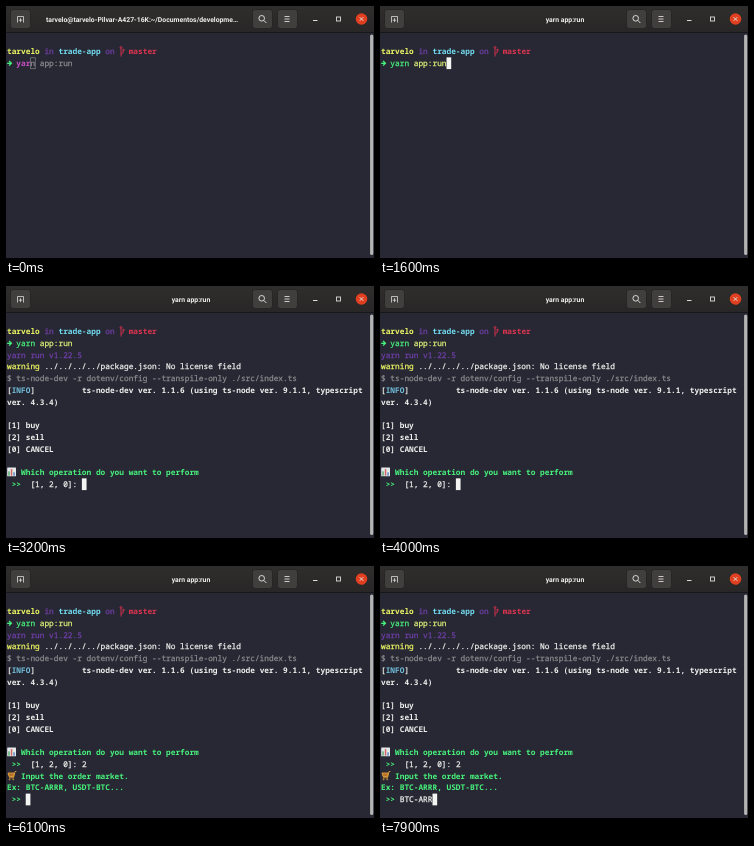
These frames come from a looping animation (368x252 px, 8 s). An HTML page:

```html
<!DOCTYPE html>
<html lang="en">
<head>
<meta charset="utf-8">
<title>Terminal</title>
<style>
  html, body { margin: 0; width: 100%; height: 100%; overflow: hidden; background: #272833; }
  svg { display: block; width: 368px; height: 252px; }
  text { white-space: pre; text-rendering: geometricPrecision; }
  #screen text { font: 500 7.8px "Noto Sans Mono", "DejaVu Sans Mono", monospace; font-variant-ligatures: none; stroke-width: .25; }
  #screen text.bold { font-weight: 700; stroke-width: 0; }
  .title { font: 700 6.85px Roboto, "Open Sans", sans-serif; fill: #f0efed; text-anchor: middle; }
  .button { fill: #413f3e; stroke: #242222; stroke-width: .8; }
  .icon { fill: none; stroke: #dddbd9; stroke-width: 1; }
</style>
</head>
<body>
<svg viewBox="0 0 368 252">
  <defs>
    <linearGradient id="bar" x2="0" y2="1">
      <stop stop-color="#302e2d"/><stop offset="1" stop-color="#282626"/>
    </linearGradient>
  </defs>
  <rect width="368" height="252" fill="#272833"/>
  <rect x="364.1" y="28.5" width="3.2" height="220.5" rx="1.6" fill="#b4b4b5"/>

  <rect width="368" height="26.5" fill="url(#bar)"/>
  <path d="M0 26.5H368" stroke="#191819"/>
  <g class="button">
    <rect x="4.5" y="3.5" width="20" height="19" rx="3"/>
    <rect x="246.5" y="3.5" width="20" height="19" rx="3"/>
    <rect x="271.5" y="3.5" width="20" height="19" rx="3"/>
  </g>
  <g class="icon">
    <path d="M11.5 16.5V10.5H17.5V16.5M14.5 12.2V16M12.8 14.2H16.2" stroke-width=".8"/>
    <circle cx="255.7" cy="12.3" r="2.8"/>
    <path d="M257.8 14.4L260.4 17"/>
    <path d="M278.5 10.5H283.5M278.5 13H283.5M278.5 15.5H283.5" stroke-width=".9"/>
    <path d="M307 14.5H311.5"/>
    <rect x="330.5" y="11" width="4" height="4" stroke-width=".9"/>
  </g>
  <circle cx="355.5" cy="13" r="5.8" fill="#e0401f"/>
  <path class="icon" d="M353.7 11.2L357.3 14.8M357.3 11.2L353.7 14.8"/>
  <g id="titles"></g>

  <g id="screen">
    <g fill="none" stroke="#dc3350" stroke-width=".9">
      <path d="M115 42.5V50.5M115 48Q117.5 47.3 117.5 44.8"/>
      <circle cx="115" cy="41.5" r=".9"/>
      <circle cx="117.5" cy="44" r=".8"/>
    </g>
    <path d="M1.2 57.3H4.6M3.1 55L5.4 57.3L3.1 59.6" fill="none" stroke="#48f37d" stroke-width="1.3"/>
  </g>
</svg>

<script>
const LOOP = 8000, CELL = 4.68, LINE = 11.75, LEFT = 1, TOP = 39.6;
const color = {
  white: '#f0f0ee', gray: '#8b8b8f', yellow: '#f0f963', lime: '#dcf279', cyan: '#72dcf2',
  blue: '#71bfdd', purple: '#703fa8', magenta: '#c94fc4', red: '#e03551', green: '#48f37d'
};
const screen = document.getElementById('screen');
const timed = [];

function add(parent, tag, attrs, from = 0, to = LOOP) {
  const el = document.createElementNS('http://www.w3.org/2000/svg', tag);
  for (const key in attrs) el.setAttribute(key, attrs[key]);
  parent.append(el);
  if (from > 0 || to < LOOP) timed.push({ el, from, to });
  return el;
}

const cellX = col => LEFT + col * CELL;
const cellY = row => TOP + row * LINE;

function write(row, col, text, fill, from, to, bold = false) {
  add(screen, 'text', {
    x: cellX(col), y: cellY(row) + 8.4, fill: color[fill], stroke: color[fill], class: bold ? 'bold' : ''
  }, from, to).textContent = text;
}
const strong = (row, col, text, fill, from, to) => write(row, col, text, fill, from, to, true);

function title(text, x, from, to) {
  add(document.getElementById('titles'), 'text', { class: 'title', x, y: 15.6 }, from, to).textContent = text;
}

title('tarvelo@tarvelo-Pilvar-A427-16K:~/Documentos/developme…', 136, 0, 1600);
title('yarn app:run', 185, 1600);

// Cursor steps: time, row, column; no column hides it.
const cursorSteps = [
  [100, 1, 6], [700], [1100, 1, 14], [2000, 5, 0], [2200], [2800, 7, 0],
  [3200, 13, 16], [3400], [4000, 13, 16], [4600], [4900, 13, 16],
  [5500, 13, 17], [6100, 16, 4], [6700, 16, 5], [6800, 16, 6], [6900, 16, 7],
  [7400, 16, 8], [7600, 16, 9], [7700, 16, 10], [7900, 16, 11]
];
cursorSteps.forEach(([from, row, col], i) => {
  if (col === undefined) return;
  const to = cursorSteps[i + 1]?.[0] ?? LOOP;
  add(screen, 'rect', { x: cellX(col), y: cellY(row), width: CELL, height: LINE, fill: '#f4f4f2' }, from, to);
});
add(screen, 'rect', {
  x: cellX(5) + .2, y: cellY(1) + .4, width: CELL, height: LINE - .8,
  fill: 'none', stroke: '#77777c', 'stroke-width': .8
}, 0, 100);

// Shell prompt
strong(0, 0, 'tarvelo', 'yellow');
write(0, 8, 'in', 'purple');
strong(0, 11, 'trade-app', 'cyan');
write(0, 21, 'on', 'purple');
strong(0, 26, 'master', 'red');
strong(1, 2, 'yar', 'magenta', 0, 100);
write(1, 5, 'n', 'gray', 0, 100);
write(1, 2, 'yarn', 'green', 100);
write(1, 7, 'app:run', 'gray', 0, 1100);
write(1, 7, 'app:run', 'lime', 1100);

// Startup output
write(2, 0, 'yarn run v1.22.5', 'purple', 2000);
write(3, 0, 'warning', 'yellow', 2000);
write(3, 8, '../../../../package.json: No license field', 'white', 2000);
write(4, 0, '$ ts-node-dev -r dotenv/config --transpile-only ./src/index.ts', 'gray', 2000);
strong(5, 0, '[', 'white', 2200);
strong(5, 1, 'INFO', 'blue', 2200);
strong(5, 5, ']', 'white', 2200);
strong(5, 16, 'ts-node-dev ver. 1.1.6 (using ts-node ver. 9.1.1, typescript', 'white', 2200);
strong(6, 0, 'ver. 4.3.4)', 'white', 2200);

// Menu
['[1] buy', '[2] sell', '[0] CANCEL'].forEach((text, i) => strong(8 + i, 0, text, 'white', 3200));
strong(12, 3, 'Which operation do you want to perform', 'green', 3200);
strong(13, 1, '>>', 'green', 3200);
write(13, 5, '[1, 2, 0]:', 'white', 3200);
write(13, 16, '2', 'white', 5500);

// Market input
strong(14, 3, 'Input the order market.', 'green', 6100);
strong(15, 0, 'Ex: BTC-ARRR, USDT-BTC...', 'green', 6100);
strong(16, 1, '>>', 'green', 6100);
const keyTimes = [6700, 6800, 6900, 7400, 7600, 7700, 7900];
[...'BTC-ARR'].forEach((key, i) => write(16, 4 + i, key, 'white', keyTimes[i]));

// Bar chart and shopping cart
const chart = add(screen, 'g', {}, 3200);
add(chart, 'rect', { x: 1.2, y: 181.5, width: 8.8, height: 8.8, rx: .5, fill: '#e4e8eb' });
[['#5fae70', 2.3, 4.4], ['#d4685c', 4.8, 6.6], ['#5a8fc9', 7.3, 3.4]].forEach(([fill, x, height]) =>
  add(chart, 'rect', { x, y: 189.7 - height, width: 1.5, height, fill }));

const cart = add(screen, 'g', { fill: 'none', stroke: '#e0a03c', 'stroke-width': .9 }, 6100);
add(cart, 'path', { d: 'M2 207H8.3L7.5 210.5H3Z', fill: '#b5702c' });
add(cart, 'path', { d: 'M10.3 205.5H9L7.5 211.8H3' });
add(cart, 'circle', { cx: 3.6, cy: 213.3, r: .5 });
add(cart, 'circle', { cx: 7.2, cy: 213.3, r: .5 });

const start = performance.now();
function draw() {
  const time = (performance.now() - start) % LOOP;
  for (const { el, from, to } of timed) {
    el.style.display = time >= from && time < to ? '' : 'none';
  }
  requestAnimationFrame(draw);
}
draw();
</script>
</body>
</html>
```
